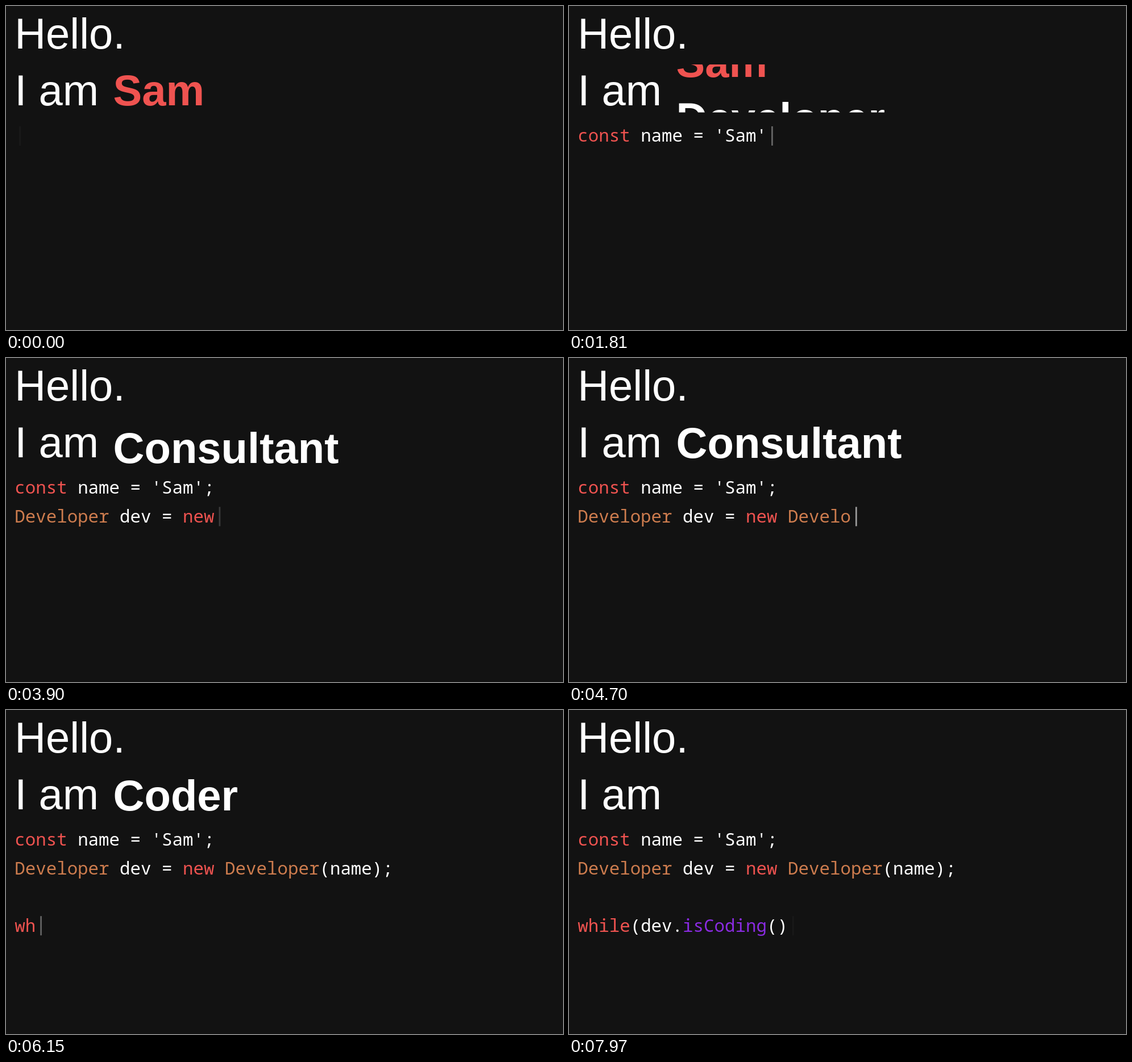
Write an HTML page that moves like this. It is 980 px wide and 571 px high and loops after 8000 ms.

```html
<!DOCTYPE html>
<html lang="en">
<head>
<meta charset="utf-8">
<title>Hello</title>
<style>
  html, body { margin: 0; width: 100%; height: 100%; overflow: hidden; background: #121212; }
  svg { display: block; width: 100%; height: 100%; }
  text { white-space: pre; fill: #fff; }
  .head { font: 76px "Liberation Sans", Arial, sans-serif; }
  .word { font-weight: bold; }
  .code { font: 30.82px "Noto Sans Mono", "DejaVu Sans Mono", monospace; }
</style>
</head>
<body>
<svg viewBox="0 0 980 571">
  <clipPath id="slot"><rect x="180" y="103" width="780" height="84.5"/></clipPath>
  <text class="head" x="15.2" y="75">Hello.</text>
  <text class="head" x="15.2" y="174.5">I am</text>
  <g clip-path="url(#slot)"><g id="words"></g></g>
  <g id="code"></g>
  <rect id="cursor" width="2.8" height="34" fill="#fff"/>
</svg>
<script>
const LOOP = 8000;
const RED = '#ef5350', ORANGE = '#cd7c4e', PURPLE = '#8a2be2', WHITE = '#fff';
const ADVANCE = 18.49, LINE = 50.4;
const $ = id => document.getElementById(id);

function addText(parent, cls, x, y, fill, content = '') {
  const el = document.createElementNS('http://www.w3.org/2000/svg', 'text');
  el.setAttribute('class', cls);
  el.setAttribute('x', x);
  el.setAttribute('y', y);
  el.style.fill = fill;
  el.textContent = content;
  parent.append(el);
  return el;
}

// Rolling words
const ITEM = 99, STEP = 98.4, ROLL = 480;
const rolls = [1568, 3510, 5560, 7555];
['Sam', 'Developer', 'Consultant', 'Coder'].forEach((word, i) =>
  addText($('words'), 'head word', 188.6, 174.8 + i * ITEM, i ? WHITE : RED, word));

// Typed code
const lines = [
  [[RED, 'const'], [WHITE, ' name = \'Sam\';']],
  [[ORANGE, 'Developer'], [WHITE, ' dev = '], [RED, 'new'], [WHITE, ' '],
   [ORANGE, 'Developer'], [WHITE, '(name);']],
  [],
  [[RED, 'while'], [WHITE, '(dev.'], [PURPLE, 'isCoding'], [WHITE, '()']]
];
const tokens = [], lineStarts = [];
let total = 0;
lines.forEach((line, row) => {
  const first = total;
  lineStarts.push(first);
  for (const [fill, str] of line) {
    const x = 15.2 + (total - first) * ADVANCE;
    tokens.push({ str, start: total, el: addText($('code'), 'code', x, 239.3 + row * LINE, fill) });
    total += str.length;
  }
  total++; // line break
});

// Typing pace: [time, characters typed]
const pace = [
  [0, 0], [320, 0.5], [790, 5.5], [1610, 16.5], [1810, 18.5], [2480, 23.5],
  [2830, 27.5], [3340, 33.5], [3900, 39.5], [4180, 40.5], [5050, 50.5],
  [5600, 56.5], [5890, 58.5], [6730, 66.5], [7400, 72.5], [7550, 75.5],
  [7970, 78.5], [LOOP, 78.5]
];

function typedAt(t) {
  const i = pace.findIndex(p => p[0] > t);
  const [t0, n0] = pace[i - 1], [t1, n1] = pace[i];
  return Math.floor(n0 + (n1 - n0) * (t - t0) / (t1 - t0));
}

const clamp = v => Math.min(1, Math.max(0, v));
const easeInOut = v => v * v * (3 - 2 * v);

function draw(t) {
  const rolled = rolls.reduce((sum, s) => sum + easeInOut(clamp((t - s) / ROLL)), 0);
  $('words').setAttribute('transform', `translate(0 ${-rolled * STEP})`);

  const n = typedAt(t);
  for (const { str, start, el } of tokens) {
    const shown = str.slice(0, Math.max(0, n - start));
    if (el.textContent !== shown) el.textContent = shown;
  }

  const row = lineStarts.filter(s => s <= n).length - 1;
  const phase = ((t + 15) % 1000) / 1000;
  const cursor = $('cursor');
  cursor.setAttribute('x', 23.2 + (n - lineStarts[row]) * ADVANCE);
  cursor.setAttribute('y', 212 + row * LINE);
  cursor.setAttribute('opacity', 1 - Math.abs(2 * phase - 1));
}

const begin = performance.now();
function tick() {
  draw((performance.now() - begin) % LOOP);
  requestAnimationFrame(tick);
}
tick();
</script>
</body>
</html>
```
